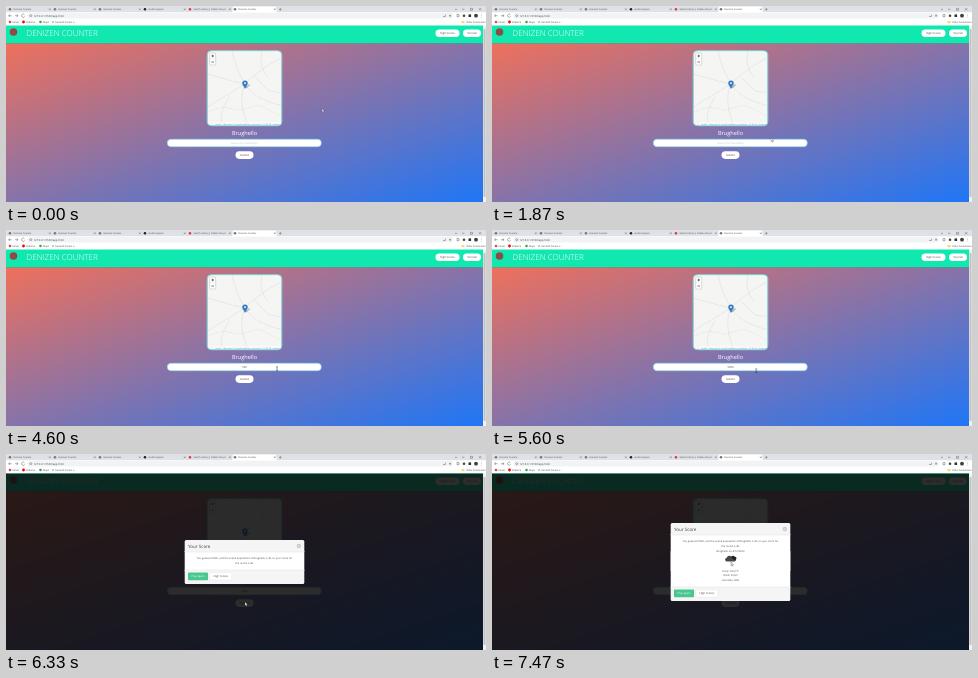
These frames come from a looping animation (480 by 196 pixels, 8000 ms). An HTML page:

```html
<!DOCTYPE html>
<html lang="en">
<head>
<meta charset="utf-8">
<title>Denizen Counter</title>
<style>
  html, body { margin: 0; width: 100%; height: 100%; overflow: hidden; background: #fff; }
  svg { display: block; width: 100%; height: 100%; }
  text { font-family: "Open Sans", "Noto Sans", sans-serif; font-size: 2.7px; fill: #444; text-rendering: geometricPrecision; }
  .mid { text-anchor: middle; }
  .tab { font-size: 2.3px; }
  .mark { font-size: 2.4px; }
  .body { font-size: 2.55px; fill: #4a4a4a; }
  .white { fill: #fff; }
  .line { fill: none; stroke: #5f6368; stroke-width: .5; }

  .timed { opacity: 0; animation: 8s step-end infinite; }
  .hint { animation-name: hint; }
  .caret { animation-name: caret; }
  .one { animation-name: one; }
  .two { animation-name: two; }
  .three { animation-name: three; }
  .four { animation-name: four; }
  .modal { animation-name: modal; }
  .more { animation-name: more; }
  .up { animation: up 8s step-end infinite; }
  .down { animation: down 8s step-end infinite; }
  .pointer { animation: pointer 8s linear infinite; }
  .arrow { animation-name: arrow; }
  .beam { animation-name: beam; }
  .hand { animation-name: hand; }

  @keyframes hint { 0% { opacity: 1 } 45.87%, 100% { opacity: 0 } }
  @keyframes caret { 0% { opacity: 0 } 35% { opacity: 1 } 41.62%, 100% { opacity: 0 } }
  @keyframes one { 0% { opacity: 0 } 45.87% { opacity: 1 } 52.5%, 100% { opacity: 0 } }
  @keyframes two { 0% { opacity: 0 } 52.5% { opacity: 1 } 57.5%, 100% { opacity: 0 } }
  @keyframes three { 0% { opacity: 0 } 57.5% { opacity: 1 } 60%, 100% { opacity: 0 } }
  @keyframes four { 0% { opacity: 0 } 60%, 100% { opacity: 1 } }
  @keyframes modal { 0% { opacity: 0 } 79.1%, 100% { opacity: 1 } }
  @keyframes more { 0% { opacity: 0 } 81.6%, 100% { opacity: 1 } }
  @keyframes up { 0% { transform: none } 81.6%, 100% { transform: translateY(-17px) } }
  @keyframes down { 0% { transform: none } 81.6%, 100% { transform: translateY(17px) } }
  @keyframes pointer {
    0%, 19.5% { transform: translate(316px, 102.5px) }
    25.5% { transform: translate(259px, 148px) }
    29%, 68% { transform: translate(271px, 138px) }
    77.5%, 89.5% { transform: translate(239px, 148px) }
    93.3%, 100% { transform: translate(239px, 108px) }
  }
  @keyframes arrow { 0% { opacity: 1 } 27.5% { opacity: 0 } 72% { opacity: 1 } 76% { opacity: 0 } 79.1%, 100% { opacity: 1 } }
  @keyframes beam { 0% { opacity: 0 } 27.5% { opacity: 1 } 72%, 100% { opacity: 0 } }
  @keyframes hand { 0% { opacity: 0 } 76% { opacity: 1 } 79.1%, 100% { opacity: 0 } }
</style>
</head>
<body>
<svg viewBox="0 0 480 196" preserveAspectRatio="none">
  <defs>
    <linearGradient id="sky" x2="1" y2="1">
      <stop stop-color="#ee705c"/>
      <stop offset="1" stop-color="#1f76f6"/>
    </linearGradient>
    <clipPath id="mapClip"><rect x="201.5" y="45" width="74" height="74.5" rx="4"/></clipPath>
  </defs>

  <!-- Browser frame -->
  <rect width="480" height="6.5" fill="#dee1e6"/>
  <path d="M225 6.5q1.5 0 1.5-1.5V2q0-1.4 1.4-1.4h41.2q1.4 0 1.4 1.4v3q0 1.5 1.5 1.5z" fill="#fff"/>
  <g id="tabs"></g>
  <path class="line" d="M273 3.3h2.6m-1.3-1.3v2.6M449 3.3h2M456 3.3h2.4M464.5 2.3h2v2h-2zM473 2.2l2.2 2.2m0-2.2l-2.2 2.2" stroke-width=".4"/>
  <rect y="6.5" width="480" height="13" fill="#fff"/>
  <rect x="21.5" y="7" width="425.5" height="5.6" rx="2.8" fill="#f1f3f4"/>
  <path class="line" d="M5.6 9.7H2.6l1.4-1.4M2.6 9.7l1.4 1.4M9 9.7h3l-1.4-1.4M12 9.7l-1.4 1.4M18.5 8.9a1.6 1.6 0 1 0 .1 1.4"/>
  <circle class="line" cx="24.7" cy="9.7" r="1"/>
  <text x="27.5" y="10.7" font-size="2.6">127.0.0.1:5500/app.html</text>
  <path class="line" d="M437 10.5h2.4V8.6M443 9.7h2.2m-1.1-1.2v2.4M451 8.5h2v2.3h-2zM475.5 8.3v.5m0 .8v.5m0 .8v.5"/>
  <circle cx="458" cy="9.7" r="1.3" fill="#444"/>
  <rect x="462.5" y="8.4" width="2.6" height="2.6" fill="#333"/>
  <circle cx="470" cy="9.7" r="1.9" fill="#3c4043"/>
  <circle cx="4" cy="16" r="1.3" fill="#dc4b3e"/>
  <text class="mark" x="6.5" y="16.9">Email</text>
  <circle cx="17.5" cy="16" r="1.4" fill="#f00"/>
  <text class="mark" x="20" y="16.9">Vidlume</text>
  <circle cx="34.5" cy="16" r="1.3" fill="#34a853"/>
  <text class="mark" x="37" y="16.9">Maps</text>
  <circle cx="47" cy="16" r="1.1" fill="#bbb"/>
  <text class="mark" x="49" y="16.9">Yarnleaf Casino L…</text>
  <rect x="455.5" y="14.9" width="3" height="2.3" rx=".3" fill="#f8d775"/>
  <text class="mark" x="460" y="16.9">Other bookmarks</text>

  <!-- Page -->
  <rect y="37" width="477" height="159" fill="url(#sky)"/>
  <rect y="37" width="477" height="1" fill="#455" opacity=".25"/>
  <rect y="19.5" width="477" height="17.8" fill="#10e8b0"/>
  <rect x="477" y="19.5" width="3" height="176.5" fill="#f1f1f1"/>
  <rect x="477.5" y="23" width="2" height="168" fill="#c1c1c1"/>
  <circle cx="7.5" cy="26" r="3.8" fill="#8c4a48"/>
  <text class="white" x="20.5" y="30" style="font-size:8.1px;font-weight:300">DENIZEN COUNTER</text>
  <rect x="429.5" y="23.5" width="24" height="7.5" rx="3.75" fill="#fff"/>
  <text class="mid" x="441.5" y="28.2">High Scores</text>
  <rect x="457" y="23.5" width="18" height="7.5" rx="3.75" fill="#fff"/>
  <text class="mid" x="466" y="28.2">Tutorial</text>

  <!-- Map -->
  <g clip-path="url(#mapClip)">
    <rect x="201" y="44" width="76" height="77" fill="#f5f5f3"/>
    <g fill="none" stroke="#dededc" stroke-width=".6">
      <path d="M201 102c12-10 24-14 37-24s20-18 39-27M216 120c-3-14 3-22 7-29M226 45c3 13 7 23 13 33s17 17 38 22"/>
      <path d="M201 68c13 3 26 8 38 10M239 78c-6 13-3 27 3 42M249 71l14 14 14 2M256 45c-2 11-1 18 6 26"/>
      <path d="M201 106l16-5 16 3 20-5 24 12" stroke-dasharray="2 1"/>
    </g>
    <rect x="208" y="116.4" width="69" height="4" fill="#fff" opacity=".8"/>
    <text x="209" y="118.8" style="font-size:2px;fill:#4789ad">Leaflet | Map data © OpenStreetMap contributors, CC-BY-SA, Imagery</text>
  </g>
  <rect x="201.2" y="44.7" width="74.6" height="75" rx="4" fill="none" stroke="#7ce4e4" stroke-width=".9"/>
  <rect x="203.7" y="47" width="6" height="12" rx="1" fill="#fff" stroke="#bbb" stroke-width=".5"/>
  <path d="M204 53h5.4" stroke="#ccc" stroke-width=".3"/>
  <path d="M205.4 50h2.6m-1.3-1.3v2.6M205.4 56h2.6" stroke="#222" stroke-width=".6"/>
  <path d="M239 82l4-4 1 1-3 3z" fill="#777" opacity=".5"/>
  <path d="M239 82.5c-.6-2-2.5-3.4-2.5-5.3a2.5 2.5 0 0 1 5 0c0 1.900-1.900 3.300-2.500 5.300z" fill="#2a81cb" stroke="#1d5f9a" stroke-width=".4"/>
  <circle class="white" cx="239" cy="77.200" r=".9"/>

  <!-- Guess form -->
  <text class="mid white" x="238.500" y="129" style="font-size:5.6px">Brughello</text>
  <rect x="161.300" y="133.300" width="154" height="7.400" rx="3.700" fill="#fff" stroke="#7ce0ee" stroke-width=".6"/>
  <g class="mid">
    <text class="timed hint" x="238.500" y="138" style="fill:#c4c4c4">Guess the Population</text>
    <text class="timed one" x="238.500" y="138">5</text>
    <text class="timed two" x="238.500" y="138">50</text>
    <text class="timed three" x="238.500" y="138">500</text>
    <text class="timed four" x="238.500" y="138">5000</text>
  </g>
  <rect class="timed caret" x="238.300" y="135.200" width=".4" height="3.600" fill="#333"/>
  <rect x="229.500" y="145.300" width="18" height="7.600" rx="3.800" fill="#fff"/>
  <text class="mid" x="238.500" y="150.100">Submit</text>

  <!-- Result card -->
  <g class="timed modal">
    <rect y="19.500" width="477" height="176.500" fill="#0a0a0a" opacity=".86"/>
    <rect x="178.700" y="97" width="119.600" height="20" fill="#fff"/>
    <rect class="timed more" x="178.700" y="80" width="119.600" height="54" fill="#fff"/>
    <g class="up">
      <path d="M178.700 98V87.500q0-1.500 1.500-1.500h116.600q1.500 0 1.500 1.500V98z" fill="#f5f5f5"/>
      <path d="M178.700 98h119.600" stroke="#dbdbdb" stroke-width=".4"/>
      <text x="182" y="93.700" style="font-size:4.500px">Your Score</text>
      <circle cx="292.800" cy="92" r="2.200" fill="#c8c8c8"/>
      <path d="M292 91.200l1.600 1.600m0-1.600l-1.600 1.600" stroke="#fff" stroke-width=".4"/>
      <g class="mid">
        <text class="body" x="238.500" y="105.300">You guessed 5000, and the actual population of Brughello is 38, so your score for</text>
        <text class="body" x="238.500" y="109.500">the round is 46.</text>
      </g>
    </g>
    <g class="timed more mid">
      <text class="body" x="238.500" y="97.700">Brughello on 4/12/2023</text>
      <path d="M234.500 107.500a1.900 1.900 0 0 1 .2-3.700 2.700 2.700 0 0 1 4.800-.9 2 2 0 0 1 3.200 1.300 1.700 1.700 0 0 1 .1 3.300z" fill="#48484a"/>
      <path d="M239 103.300a2 2 0 0 1 3.700-.5 1.600 1.600 0 0 1 1.100 2.900h-2z" fill="#222"/>
      <text class="body" x="238.500" y="117.800">Temp: 59.67°F</text>
      <text class="body" x="238.500" y="122.100">Wind: 5mph</text>
      <text class="body" x="238.500" y="126.500">Humidity: 48%</text>
    </g>
    <g class="down">
      <path d="M178.700 116v12.500q0 1.500 1.500 1.500h116.600q1.500 0 1.500-1.500V116z" fill="#f5f5f5"/>
      <path d="M178.700 116h119.600" stroke="#dbdbdb" stroke-width=".4"/>
      <rect x="182" y="118.600" width="20" height="7.600" rx=".8" fill="#48c78e"/>
      <text class="mid white" x="192" y="123.400">Play Again</text>
      <rect x="203.800" y="118.700" width="22" height="7.400" rx=".8" fill="#fff" stroke="#dbdbdb" stroke-width=".3"/>
      <text class="mid" x="214.800" y="123.400">High Scores</text>
    </g>
  </g>

  <g class="pointer">
    <path class="timed arrow" d="M0 0v3.600l.8-.7.6 1.300.6-.3-.6-1.200h1.200z" fill="#fff" stroke="#222" stroke-width=".3"/>
    <path class="timed beam" d="M-.8-1.200h1.600M0-1.200v3.800m-.8 0h1.600" stroke="#222" stroke-width=".5"/>
    <path class="timed hand" d="M0 0q.5 0 .5.600v1.200l1.500.3q.5.200.4.900l-.4 1.500h-2.200l-1.300-1.900q0-.6 1 0v-2q0-.6.500-.6z" fill="#fff" stroke="#222" stroke-width=".35"/>
  </g>
</svg>
<script>
  const game = "Denizen Counter";
  const tabs = [
    [game, "#777"], [game, "#777"], [game, "#777"],
    ["Quillo Express", "#222"], ["Sketch Library | Palette Cloud", "#e5344a"], [game, "#777"]
  ];
  document.getElementById("tabs").innerHTML = tabs.map(([title, color], i) => {
    const x = 3 + 45 * i;
    return `<circle cx="${x + 1}" cy="3.3" r="1.3" fill="${color}"/>
      <text class="tab" x="${x + 4.5}" y="4.1">${title}</text>
      <path class="line" d="M${x + 40} 2.5l1.600 1.600m0-1.600l-1.600 1.600" stroke-width=".3"/>`;
  }).join("");
</script>
</body>
</html>
```
